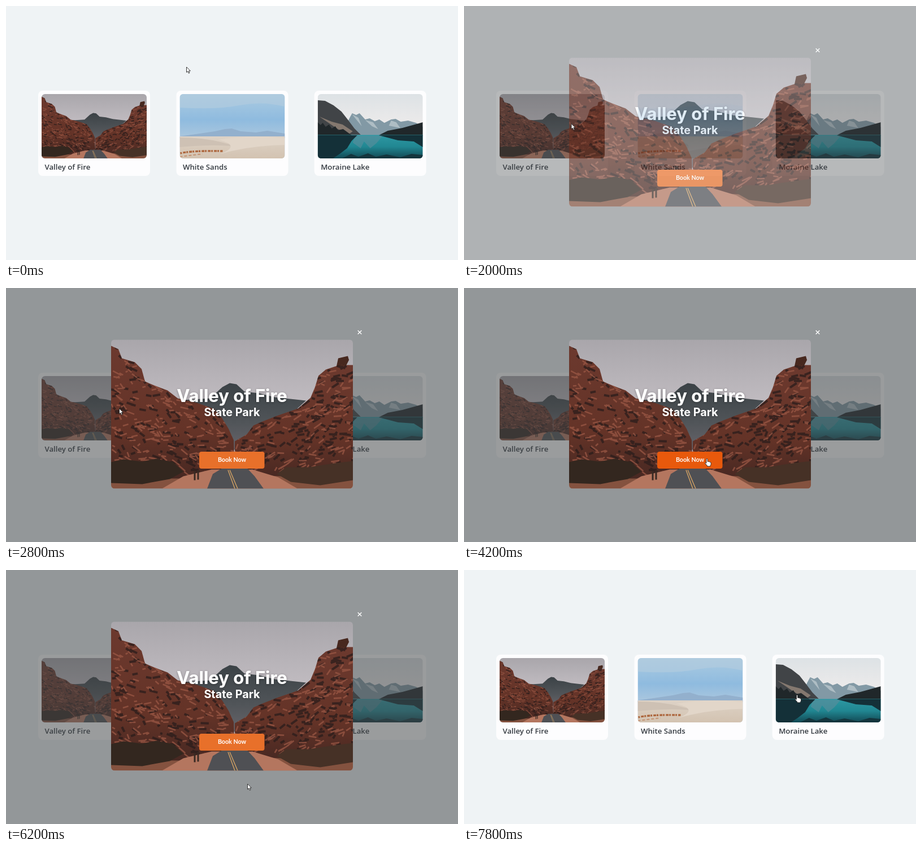
Recreate the animation shown at these times as an HTML page. Size 800 px wide and 450 px high, loop 8000 ms.

```html
<!DOCTYPE html>
<html lang="en">
<head>
<meta charset="utf-8">
<title>Travel cards</title>
<style>
  html, body { margin: 0; width: 100%; height: 100%; overflow: hidden; background: #eff3f5; }
  svg { display: block; }
  .label { font: 600 13.2px "Open Sans", sans-serif; fill: #343a40; }
  .heading { font-family: Inter, sans-serif; font-weight: 700; fill: #fff; text-anchor: middle; filter: url(#shadow); }
  .action { font: 700 10.7px Lato, sans-serif; fill: #fff; text-anchor: middle; }
</style>
</head>
<body>
<svg id="stage" width="800" height="450" viewBox="0 0 800 450">
  <defs>
    <linearGradient id="duskSky" x2="0" y2="1">
      <stop stop-color="#a9a6ab"/><stop offset=".42" stop-color="#c0bbc0"/>
    </linearGradient>
    <linearGradient id="peak" x2="0" y2="1">
      <stop stop-color="#3b4246"/><stop offset=".6" stop-color="#515559"/><stop offset="1" stop-color="#66646a"/>
    </linearGradient>
    <linearGradient id="rock" x2="0" y2="1">
      <stop stop-color="#6c392e"/><stop offset=".65" stop-color="#643327"/><stop offset="1" stop-color="#472822"/>
    </linearGradient>
    <linearGradient id="blueSky" x2="0" y2="1">
      <stop stop-color="#a9c9df"/><stop offset=".2" stop-color="#9dc3e0"/>
      <stop offset=".4" stop-color="#8fbbdf"/><stop offset=".66" stop-color="#a9c6de"/>
    </linearGradient>
    <linearGradient id="sand" x2="0" y2="1">
      <stop stop-color="#ddd2c6"/><stop offset="1" stop-color="#d3c3b1"/>
    </linearGradient>
    <linearGradient id="paleSky" x2="0" y2="1">
      <stop stop-color="#dde2e5"/><stop offset=".5" stop-color="#edebeb"/>
    </linearGradient>
    <linearGradient id="water" x2="0" y2="1">
      <stop stop-color="#2d98a3"/><stop offset=".5" stop-color="#218792"/><stop offset="1" stop-color="#124853"/>
    </linearGradient>
    <filter id="shadow" x="-10%" y="-30%" width="120%" height="170%">
      <feDropShadow dx="0" dy="1" stdDeviation="2" flood-opacity=".3"/>
    </filter>
    <clipPath id="thumbClip"><rect width="186" height="114" rx="6"/></clipPath>
    <clipPath id="modalClip"><rect width="428" height="264" rx="6"/></clipPath>
    <path id="leftRock" d="M0 11 13 17 19 33 42 40 54 52 60 74 76 81 100 90 118 104 152 112 183 123 197 140 208 158 217 178 219 238 150 246H0Z"/>
    <path id="rightRock" d="M428 45H404L380 53 367 64 361 84 353 103 331 122 296 134 268 145 252 152 240 168 219 180V238L300 242 428 247Z"/>
    <clipPath id="rocksClip"><use href="#leftRock"/><use href="#rightRock"/></clipPath>

    <g id="desert">
      <rect width="428" height="264" fill="url(#duskSky)"/>
      <path fill="url(#peak)" d="M110 108 175 104 197 84 210 77 222 79 236 92 262 95 290 102 345 108 250 195H195Z"/>
      <path fill="#84523f" d="M0 236H428V264H0Z"/>
      <use href="#leftRock" fill="url(#rock)"/>
      <use href="#rightRock" fill="url(#rock)"/>
      <path fill="#47281f" d="M399 47 402 33 419 29 421 36 416 46Z"/>
      <g clip-path="url(#rocksClip)" fill="none">
        <path id="cracks" stroke="#2a1c1b" stroke-width="4" opacity=".75"/>
        <path id="ledges" stroke="#9a5745" stroke-width="2.6" opacity=".75"/>
      </g>
      <path fill="#b4765f" d="M90 264 128 242 178 230H250L296 244 330 264Z"/>
      <path fill="#33271f" d="M0 217 22 212 55 216 80 211 110 217 128 234 104 247 55 256 0 254Z"/>
      <path fill="#463126" d="M428 215 395 219 350 226 310 226 293 238 318 252 370 258 428 249Z"/>
      <path fill="#4f5054" d="M198 227H240L254 242 270 264H170L180 238Z"/>
      <path fill="none" stroke="#d3a264" stroke-width="1.4" d="M207 231 219 264M210 231 224 264"/>
      <path fill="none" stroke="#382923" stroke-width="3" d="M148 233V249M154 231V248"/>
    </g>

    <g id="dunes">
      <rect width="186" height="114" fill="url(#blueSky)"/>
      <path fill="#b4cee0" opacity=".6" d="M0 0H186V22Q145 12 105 20T0 24Z"/>
      <path fill="#93b0cd" d="M0 75 35 70 62 66 80 62 92 61 108 66 135 68 155 65 186 70V78H0Z"/>
      <rect y="75" width="186" height="39" fill="url(#sand)"/>
      <path fill="#cec1b4" d="M0 77Q40 77 72 85T110 94Q65 88 0 94Z"/>
      <path fill="#e2d6c9" d="M68 81Q120 72 186 78V90Q125 91 72 106 110 91 68 81Z"/>
      <path fill="none" stroke="#ad673e" stroke-width="3.4" stroke-dasharray="3 2 5 1" d="M1 105Q20 100 76 101"/>
      <path fill="none" stroke="#c49272" stroke-width="2" stroke-dasharray="5 3" d="M0 111 40 106"/>
    </g>

    <g id="lake">
      <rect width="186" height="114" fill="url(#paleSky)"/>
      <path fill="#8299a5" d="M45 68 56 43 61 34 68 37 74 34 84 45 92 43 101 48 109 45 118 51 130 45 138 44 147 49 160 47 174 51 186 58V74H45Z"/>
      <path fill="#aebdc4" d="M61 36 69 46 78 57 72 42ZM84 46 96 57 107 62 98 50ZM130 47 126 56 146 60 139 50Z"/>
      <path fill="#414447" d="M0 11 13 12 28 20 42 31 53 45 65 61 76 72H0Z"/>
      <path fill="#84786f" d="M3 40 25 49 44 54 62 66 54 72 34 61Z"/>
      <path fill="#20272a" d="M0 50 5 55 9 51 14 58 20 54 25 61 31 57 36 64 45 62 60 73H0ZM108 73 124 65 150 60 168 55 186 50V74Z"/>
      <rect y="72.5" width="186" height="41.5" fill="url(#water)"/>
      <path fill="#598e9b" d="M66 74H115L104 87 93 96 82 84 76 96 62 86Z" opacity=".65"/>
      <path fill="#143038" d="M0 73H70L60 83 52 96 39 106 27 114H0ZM108 73H186V94L170 84 142 82Z"/>
      <path fill="#14353d" d="M43 114 59 106 72 111 89 105 103 111 122 107 146 112 166 106 186 108V114Z"/>
    </g>
  </defs>

  <rect width="800" height="450" fill="#eff3f5"/>
  <g id="cards"></g>

  <g id="modal">
    <rect width="800" height="450" fill="#434648" opacity=".53"/>
    <g transform="translate(186 91.5)" clip-path="url(#modalClip)"><use href="#desert"/></g>
    <text class="heading" x="400" y="202" font-size="31">Valley of Fire</text>
    <text class="heading" x="400" y="227" font-size="19.8">State Park</text>
    <rect id="button" x="342" y="290" width="115.5" height="30" rx="4"/>
    <text class="action" x="400" y="308">Book Now</text>
    <path stroke="#fff" stroke-width="1.4" d="M622.7 75.2 629.3 81.8M629.3 75.2 622.7 81.8"/>
  </g>

  <g id="cursor" fill="#fff" stroke="#222" stroke-width=".9" stroke-linejoin="round">
    <path id="arrow" d="M0 0V9.6L2.2 7.6 3.8 11.2 5.5 10.4 3.9 7H6.9Z"/>
    <path id="hand" d="M-1.1 1Q-1 0 0 0T1.2 1V5L2.4 4.8Q3.2 4.9 3.4 5.5L4.6 5.3Q5.4 5.5 5.6 6.2 7 6 7.1 7.3V9.8Q6.9 11.2 6 12V13.4H.4V12.3L-3.2 8.3Q-3.6 7 -2.6 6.8L-1.1 7.9Z"/>
  </g>
</svg>

<script>
const LOOP = 8000, STEP = 100;
const $ = id => document.getElementById(id);

const CARDS = [
  { x: 57, photo: 'desert', scale: 186 / 428, title: 'Valley of Fire' },
  { x: 301.5, photo: 'dunes', scale: 1, title: 'White Sands' },
  { x: 545.7, photo: 'lake', scale: 1, title: 'Moraine Lake' },
];
const CARD = { y: 150, w: 198, h: 151 };
const BUTTON = { x: 342, y: 290, w: 115.5, h: 30 };

// Pointer stops: time, x, y
const POINTER = [
  [0, 319.5, 108], [1100, 210.8, 188.3], [1500, 190, 208.5], [2100, 190, 208.5],
  [2800, 200.5, 213.5], [3300, 205, 215], [3600, 248, 228], [4200, 430, 302.5],
  [5000, 430, 302.5], [5900, 427.5, 379], [6600, 427.5, 379], [7800, 589.5, 221.5],
];

$('cards').innerHTML = CARDS.map(c => `
  <rect x="${c.x}" y="${CARD.y}" width="${CARD.w}" height="${CARD.h}" rx="8" fill="#fdfdfe"/>
  <g transform="translate(${c.x + 6} 156)" clip-path="url(#thumbClip)">
    <use href="#${c.photo}" transform="scale(${c.scale})"/>
  </g>
  <text class="label" x="${c.x + 11.5}" y="290">${c.title}</text>`).join('');

// Short rock strokes that slope down towards the valley
function strokes(seed, count) {
  const random = () => (seed = (seed * 16807) % 2147483647) / 2147483647;
  let d = '';
  for (let i = 0; i < count; i++) {
    const x = random() * 428, y = 10 + random() * 230;
    const w = 3 + random() * 12, h = (random() - 0.3) * 14 * (x < 214 ? 1 : -1);
    d += `M${x.toFixed(1)} ${y.toFixed(1)}l${w.toFixed(1)} ${h.toFixed(1)}`;
  }
  return d;
}
$('cracks').setAttribute('d', strokes(71, 480));
$('ledges').setAttribute('d', strokes(4021, 480));

const clamp = v => Math.min(1, Math.max(0, v));
const smooth = p => p * p * (3 - 2 * p);
const easeOut = p => 1 - (1 - p) ** 2;
const inside = (x, y, r) => x >= r.x && x <= r.x + r.w && y >= r.y && y <= r.y + r.h;

function pointerAt(t) {
  const i = POINTER.findIndex(stop => stop[0] > t);
  if (i < 0) return POINTER.at(-1).slice(1);
  const [t0, x0, y0] = POINTER[i - 1], [t1, x1, y1] = POINTER[i];
  const p = smooth((t - t0) / (t1 - t0));
  return [x0 + (x1 - x0) * p, y0 + (y1 - y0) * p];
}

function draw(t) {
  const [x, y] = pointerAt(t);
  const opening = easeOut(clamp((t - 1840) / 350));
  const closing = easeOut(clamp((t - 6340) / 350));
  const modalOpen = t >= 1900 && t < 6400;
  const overButton = modalOpen && inside(x, y, BUTTON);
  const overCard = !modalOpen && CARDS.some(c => inside(x, y, { ...CARD, x: c.x }));
  const pointing = overButton || overCard;

  $('modal').setAttribute('opacity', opening * (1 - closing));
  $('button').setAttribute('fill', overButton ? '#e8590c' : '#e8702a');
  $('cursor').setAttribute('transform', `translate(${x} ${y})`);
  $('arrow').setAttribute('visibility', pointing ? 'hidden' : 'visible');
  $('hand').setAttribute('visibility', pointing ? 'visible' : 'hidden');
}

const start = performance.now();
function tick() {
  const t = (performance.now() - start) % LOOP;
  draw(Math.floor(t / STEP) * STEP);
  requestAnimationFrame(tick);
}
tick();
</script>
</body>
</html>
```
